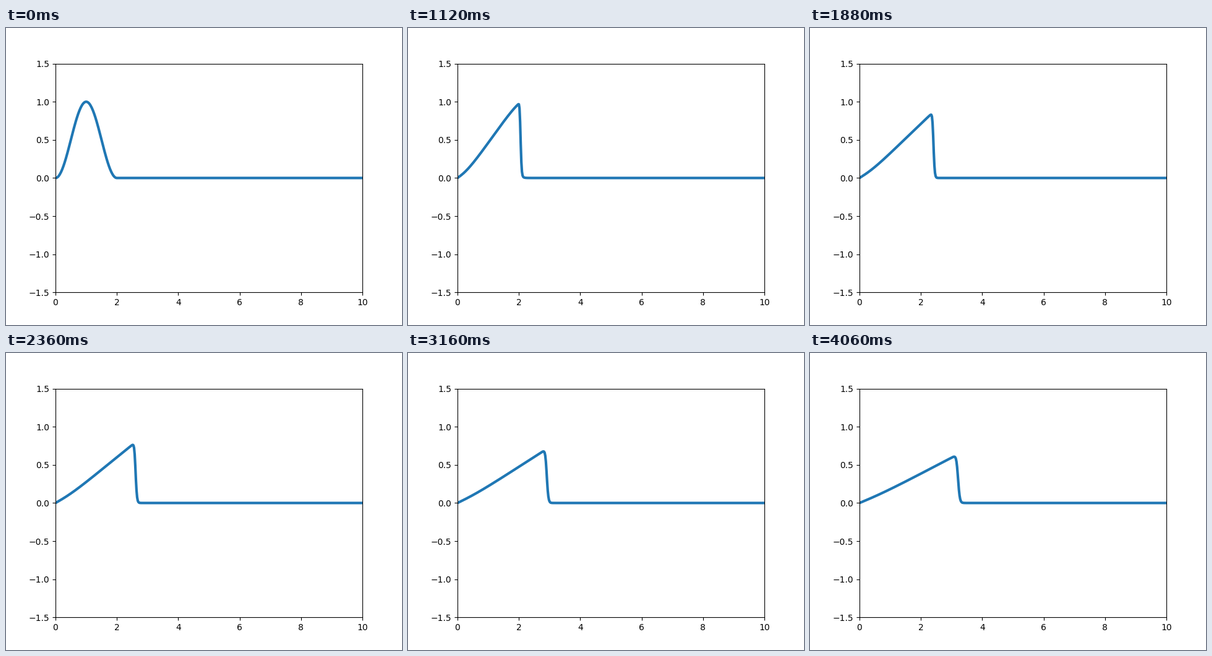
Write a matplotlib script that moves like this. It is 640 px wide and 480 px high and loops after 4080 ms.

```python
import numpy as np
import matplotlib.pyplot as plt
from matplotlib.animation import FuncAnimation

# Inviscid Burgers equation, Lax-Friedrichs scheme
FRAMES = 204
INTERVAL = 20
DX = 0.02
DT = 0.02

x = np.linspace(0, 10, 501)


def lax_friedrichs(u):
    flux = u**2 / 2
    new = u.copy()
    new[1:-1] = (u[2:] + u[:-2]) / 2 - DT / (2 * DX) * (flux[2:] - flux[:-2])
    return new


def solve(steps):
    states = [np.where(x <= 2, np.sin(np.pi * x / 2)**2, 0.0)]
    for _ in range(steps - 1):
        states.append(lax_friedrichs(states[-1]))
    return states


waves = solve(FRAMES)

fig = plt.figure(figsize=(6.4, 4.8), dpi=100)
ax = fig.add_subplot(xlim=(0, 10), ylim=(-1.5, 1.5))
line, = ax.plot(x, waves[0], lw=3)


def update(i):
    line.set_ydata(waves[i])
    return line,


anim = FuncAnimation(fig, update, frames=FRAMES, interval=INTERVAL,
                     repeat=True, repeat_delay=0)
plt.show()
```
